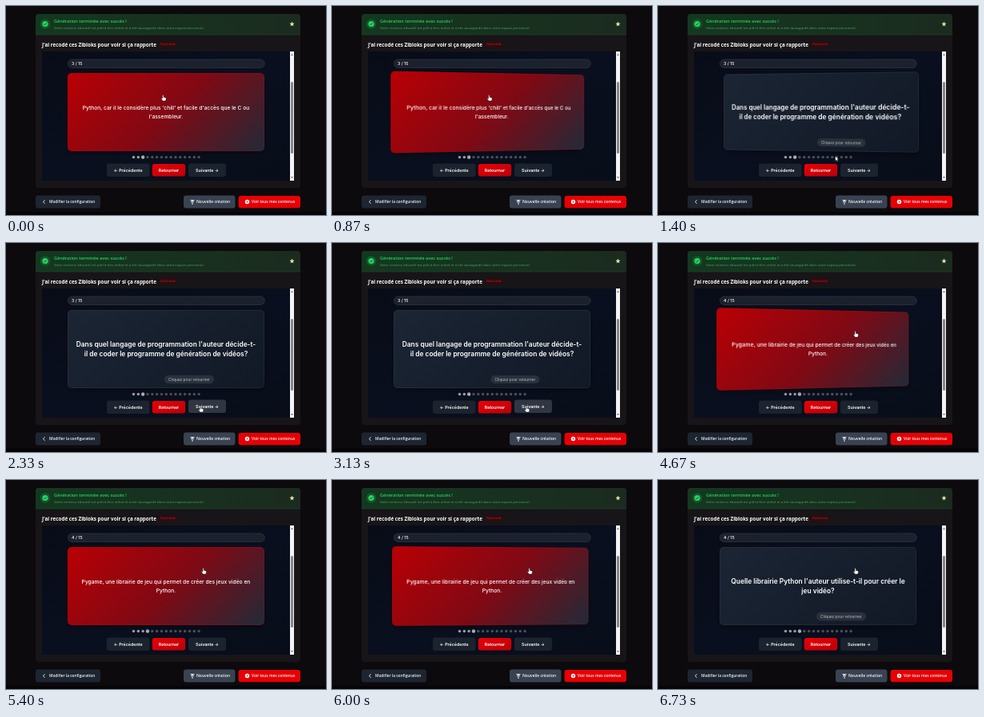
Animation, 400 px wide and 262 px high, one loop 6800 ms. Source, as an HTML page:

```html
<!DOCTYPE html>
<html lang="fr">
<head>
<meta charset="utf-8">
<style>
html, body { margin: 0; width: 100%; height: 100%; overflow: hidden; background: #0c0a0d; }
#stage { position: absolute; left: 0; top: 0; width: 400px; height: 262px; overflow: hidden; }
svg { position: absolute; left: 0; top: 0; }
text { font-family: "Open Sans", "Noto Sans", sans-serif; white-space: pre; }
.ui { font: 600 5.3px Inter, sans-serif; fill: #fff; text-anchor: middle; }
#scene { position: absolute; left: 77px; top: 84px; width: 246px; height: 97.5px; perspective: 500px; }
#card { width: 100%; height: 100%; transform-style: preserve-3d; }
.face {
  position: absolute; inset: 0; box-sizing: border-box; border-radius: 5px; padding-top: 1.6px;
  display: flex; align-items: center; justify-content: center; text-align: center;
  color: #fff; font-family: Inter, sans-serif; white-space: pre;
  backface-visibility: hidden; box-shadow: 0 3px 8px #0006;
}
#front {
  font-size: 8.4px; font-weight: 600; line-height: 11.5px;
  background: linear-gradient(135deg, #1c2533, #111927) border-box; border: 1px solid #ffffff0d;
}
#back {
  font-size: 6.7px; font-weight: 500; line-height: 10.5px; transform: rotateY(180deg);
  background: linear-gradient(135deg, #b90004, #800914 52%, #222a38) border-box;
  border: 1px solid #d0000c38;
}
#hint {
  position: absolute; left: 121px; top: 80.5px; width: 60px; height: 10px; border-radius: 5px;
  background: #2a313c; color: #bfc3ca; font-size: 4.7px; font-weight: 400; line-height: 10px;
}
</style>
</head>
<body>
<div id="stage">
  <svg width="400" height="262">
    <defs>
      <linearGradient id="banner"><stop stop-color="#14381f"/><stop offset="1" stop-color="#1b2b1f"/></linearGradient>
      <linearGradient id="night" x2="1" y2="1">
        <stop stop-color="#080c17"/><stop offset=".5" stop-color="#0a0f1f"/><stop offset="1" stop-color="#080d19"/>
      </linearGradient>
      <linearGradient id="red" x2="1" y2="1"><stop stop-color="#ea0008"/><stop offset="1" stop-color="#b80008"/></linearGradient>
    </defs>
    <rect y="258" width="400" height="4" fill="#050406"/>
    <rect x="37" y="10" width="331" height="218" rx="4" fill="#171517"/>
    <path d="M37 36V14a4 4 0 0 1 4-4H364a4 4 0 0 1 4 4V36Z" fill="url(#banner)"/>
    <path d="M37 36H368" stroke="#1d4a2b" stroke-width=".6"/>
    <circle cx="49" cy="22.5" r="6.2" fill="#17552d"/>
    <circle cx="49" cy="22.5" r="3.6" fill="#25d765"/>
    <path d="M47.3 22.6l1.2 1.2 2.2-2.4" fill="none" stroke="#143a20" stroke-width=".9"/>
    <text x="60" y="20.800" font-size="5.500" font-weight="600" fill="#22d962">Génération terminée avec succès !</text>
    <text x="60" y="28.700" font-size="4.300" fill="#4fa368">Votre contenu éducatif est prêt à être utilisé et a été sauvegardé dans votre espace personnel.</text>
    <path d="M357.500 19.500l.9 2 2.100.2-1.600 1.500.5 2.100-1.900-1.100-1.900 1.100.5-2.100-1.600-1.500 2.100-.2Z" fill="#ded9a0"/>
    <text x="45" y="50.500" font-size="6.300" font-weight="700" fill="#fff">J'ai recodé ces Zibloks pour voir si ça rapporte</text>
    <rect x="190.500" y="44.500" width="24" height="7" rx="3.500" fill="#2c0d10"/>
    <text x="202.500" y="49.300" font-size="3.900" fill="#d8141c" text-anchor="middle">Flashcards</text>

    <rect x="45" y="57" width="315" height="162" fill="url(#night)"/>
    <rect x="355" y="57" width="5" height="162" fill="#f4f4f4"/>
    <rect x="356" y="95" width="3" height="90" rx="1.500" fill="#858585"/>
    <path d="M356 62l1.500-2 1.500 2ZM356 214l1.500 2 1.500-2Z" fill="#707070"/>
    <rect x="77.300" y="67" width="246" height="10.500" rx="5.200" fill="#1b212d" stroke="#363c47" stroke-width=".6"/>
    <text id="count" x="82" y="74.200" class="ui" style="text-anchor:start;font-weight:500"></text>
    <g id="dots"></g>
    <g fill="#1b232f">
      <rect x="126" y="197.500" width="53.500" height="16.500" rx="3"/>
      <rect x="182.800" y="198" width="41.400" height="15.500" rx="3" fill="url(#red)"/>
    </g>
    <text class="ui" x="152.700" y="207.600">← Précédente</text>
    <text class="ui" x="203.500" y="207.600">Retourner</text>
    <g id="next">
      <rect x="228" y="197.500" width="47" height="16.500" rx="3"/>
      <text class="ui" x="251.500" y="207.600">Suivante →</text>
    </g>

    <rect x="37" y="237.500" width="81" height="16" rx="3" fill="#1d2531"/>
    <rect x="222" y="237.500" width="64.500" height="16" rx="3" fill="#394251"/>
    <rect x="290.600" y="238" width="77.400" height="15.200" rx="3" fill="#e60005"/>
    <g font-size="4.950" font-weight="600" fill="#f3f4f6">
      <text x="54" y="247.300" font-size="4.800">Modifier la configuration</text>
      <text x="238" y="247.300">Nouvelle création</text>
      <text x="307" y="247.300" font-size="4.800">Voir tous mes contenus</text>
    </g>
    <g fill="none" stroke="#fff" stroke-width=".9">
      <path d="M48.500 243.300l-2 2.200 2 2.200M230.500 243.500h5M233 249v-5M231 246l2-2 2 2"/>
    </g>
    <circle cx="301.500" cy="245.500" r="2.700" fill="#fff"/>
    <path d="M300.800 244.200l2 1.300-2 1.300Z" fill="#e60005"/>
  </svg>

  <div id="scene">
    <div id="card">
      <div class="face" id="front"><span id="question"></span><div id="hint">Cliquez pour retourner</div></div>
      <div class="face" id="back"><span id="answer"></span></div>
    </div>
  </div>

  <svg width="400" height="262">
    <g id="cursor" fill="#fff" stroke="#111" stroke-width=".5" stroke-linejoin="round">
      <path id="hand" transform="scale(.9)" d="M-.8 .6Q0-.5 .8 .6V3.200Q1.600 2.700 2 3.500Q2.900 3 3.200 3.900Q4.200 3.700 4.200 4.700V6Q4 7.300 3.300 8.300H-.3Q-1.600 6.800-2.600 5.100Q-2.600 4-.8 5.100Z"/>
      <path id="arrow" d="M0 0V6.200L1.500 4.900 2.500 7.100 3.500 6.600 2.500 4.500H4.500Z"/>
    </g>
  </svg>
</div>
<script>
const LOOP = 6800, FLIP = 800, NEXT = 3250;
const $ = id => document.getElementById(id);
const cards = [
  ["Dans quel langage de programmation l'auteur décide-t-\nil de coder le programme de génération de vidéos?",
   "Python, car il le considère plus 'chill' et facile d'accès que le C ou\nl'assembleur."],
  ["Quelle librairie Python l'auteur utilise-t-il pour créer le\njeu vidéo?",
   "Pygame, une librairie de jeu qui permet de créer des jeux vidéo en\nPython."]
];
const flips = [[810, 0], [4135, -180], [5970, 0]];   // start time, final angle
const path = [[0, 196.3, 111.5], [950, 196.3, 111.5], [1400, 221.5, 188], [1750, 243, 204.5],
              [3350, 243, 204.5], [3900, 246.6, 110.5], [LOOP, 246.6, 110.5]];

const clamp = x => Math.min(1, Math.max(0, x));
const smooth = x => x * x * (3 - 2 * x);

// cubic-bezier(.25, .1, .25, 1)
function ease(x) {
  let lo = 0, hi = 1, s = x;
  const curve = (a, b) => 3 * a * s * (1 - s) ** 2 + 3 * b * s * s * (1 - s) + s ** 3;
  for (let i = 0; i < 20; i++) {
    s = (lo + hi) / 2;
    if (curve(.25, .25) < x) lo = s; else hi = s;
  }
  return curve(.1, 1);
}

function angleAt(t) {
  let angle = -180;
  for (const [start, end] of flips) angle += (end - angle) * ease(clamp((t - start) / FLIP));
  return angle;
}

function cursorAt(t) {
  const i = path.findIndex(p => p[0] > t);
  const [t0, x0, y0] = path[i - 1], [t1, x1, y1] = path[i];
  const k = smooth((t - t0) / (t1 - t0));
  return [x0 + (x1 - x0) * k, y0 + (y1 - y0) * k];
}

const dots = Array.from({ length: 15 }, (_, i) => {
  const dot = document.createElementNS("http://www.w3.org/2000/svg", "circle");
  dot.setAttribute("cx", 159.5 + 5.83 * i);
  dot.setAttribute("cy", 189.5);
  return $("dots").appendChild(dot);
});

let shown = -1;
function showCard(n) {
  if (n === shown) return;
  shown = n;
  $("question").textContent = cards[n][0];
  $("answer").textContent = cards[n][1];
  $("count").textContent = `${n + 3} / 15`;
}

function draw(now) {
  const t = now % LOOP;
  showCard(t < NEXT ? 0 : 1);
  $("card").style.transform = `rotateY(${angleAt(t)}deg)`;

  const pulse = .5 + .5 * Math.cos((t - 2530) * Math.PI / 1000);
  $("hint").style.transform = `scale(${1 + .04 * pulse})`;

  const active = shown + 2, fresh = t > NEXT && t < 4200;
  dots.forEach((dot, i) => {
    dot.setAttribute("r", i === active ? 2.2 : 1.7);
    dot.setAttribute("fill", i === active ? (fresh ? "#e0222a" : "#b4b7bc") : i < active ? "#a3a7ae" : "#4d535e");
  });

  const [x, y] = cursorAt(t);
  const onNext = x > 228 && x < 275 && y > 197 && y < 214;
  const pointing = onNext || y < 181.5;
  $("cursor").setAttribute("transform", `translate(${x} ${y})`);
  $("hand").style.display = pointing ? "" : "none";
  $("arrow").style.display = pointing ? "none" : "";
  $("next").setAttribute("transform", `translate(0 ${onNext ? -1 : 0})`);
  $("next").setAttribute("fill", onNext ? "#303743" : "#1b232f");
}

const begin = performance.now();
function frame() {
  draw(performance.now() - begin);
  requestAnimationFrame(frame);
}
frame();
</script>
</body>
</html>
```
